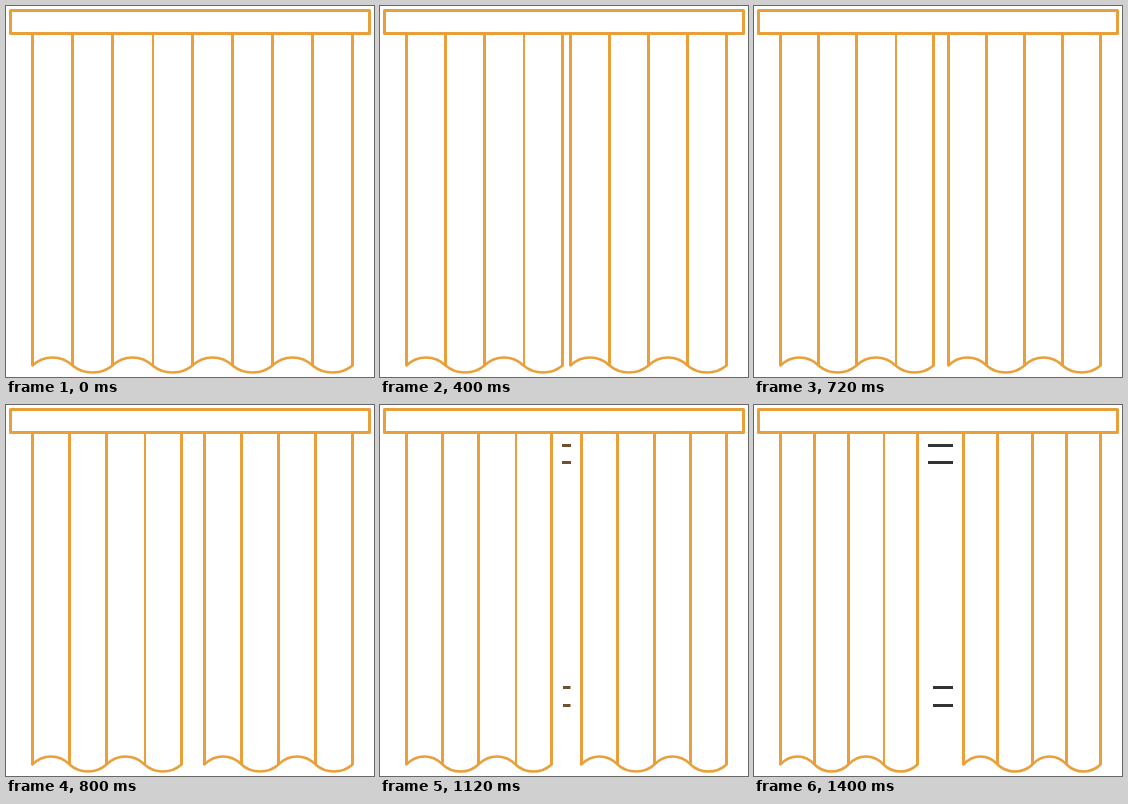
These frames come from a looping animation (368 by 371 pixels, 1600 ms). An HTML page:

```html
<!DOCTYPE html>
<html lang="en">
<head>
<meta charset="utf-8">
<title>Opening curtain</title>
<style>
  html, body { margin: 0; width: 100%; height: 100%; overflow: hidden; background: #fff; }
  svg { display: block; width: 368px; height: 371px; }
  path, rect { fill: none; stroke: #eaa03a; stroke-width: 3; }
  .thin { stroke-width: 2; }
  .hem { stroke-width: 2.5; stroke-linecap: round; }
</style>
</head>
<body>
<svg viewBox="0 0 368 371">
  <path id="folds"/>
  <path id="thinFold" class="thin"/>
  <path id="hem" class="hem"/>
  <path id="dashes"/>
  <rect x="4.5" y="4.5" width="359" height="23" stroke-linejoin="round"/>
</svg>
<script>
const LOOP = 1600, STEP = 200, SHRINK = 23 / 6;
const TOP = 28, HEM = 359.5, LEFT = 26, RIGHT = 346;
const el = id => document.getElementById(id);

// Dash extents while the gap widens: top pair, bottom pair, colour
const DASHES = {
  4: [182, 191, 183, 190.5, '#70502f'],
  5: [179, 193, 183, 193, '#4d4335'],
  6: [174, 199, 179, 199, '#333333']
};

const foldEdges = (start, width, bias) =>
  [0, 1, 2, 3, 4].map(i => Math.round(start + width * i / 4 + bias) + 0.5);

const vertical = x => `M${x} ${TOP}V${HEM + 0.5}`;

function wave(xs) {
  let d = `M${xs[0]} ${HEM}`;
  for (let i = 1; i < xs.length; i++) {
    const a = xs[i - 1], b = xs[i], pull = (b - a) * 0.28;
    const y = HEM + (i % 2 ? -8 : 7) * 4 / 3;
    d += `C${a + pull} ${y} ${b - pull} ${y} ${b} ${HEM}`;
  }
  return d;
}

function dashPath([a, b, c, d]) {
  return `M${a} 40.5H${b}M${a} 57.5H${b}M${c} 282.5H${d}M${c} 300.5H${d}`;
}

function draw(step) {
  const leftWidth = Math.floor(160.8 - SHRINK * step);
  const rightWidth = Math.floor(160.4 - SHRINK * step);
  const left = foldEdges(LEFT, leftWidth, -0.25);
  const right = foldEdges(RIGHT - rightWidth, rightWidth, 0);
  const thick = left.filter((x, i) => i !== 3).concat(right);

  el('folds').setAttribute('d', [...new Set(thick)].map(vertical).join(''));
  el('thinFold').setAttribute('d', vertical(left[3] + 0.5));
  el('hem').setAttribute('d', wave(left) + wave(right));

  const dash = DASHES[step];
  el('dashes').setAttribute('d', dash ? dashPath(dash) : '');
  if (dash) el('dashes').style.stroke = dash[4];
}

const origin = performance.now();
function tick() {
  const t = (performance.now() - origin) % LOOP;
  draw(Math.max(0, Math.floor(t / STEP) - 1));
  requestAnimationFrame(tick);
}
tick();
</script>
</body>
</html>
```
